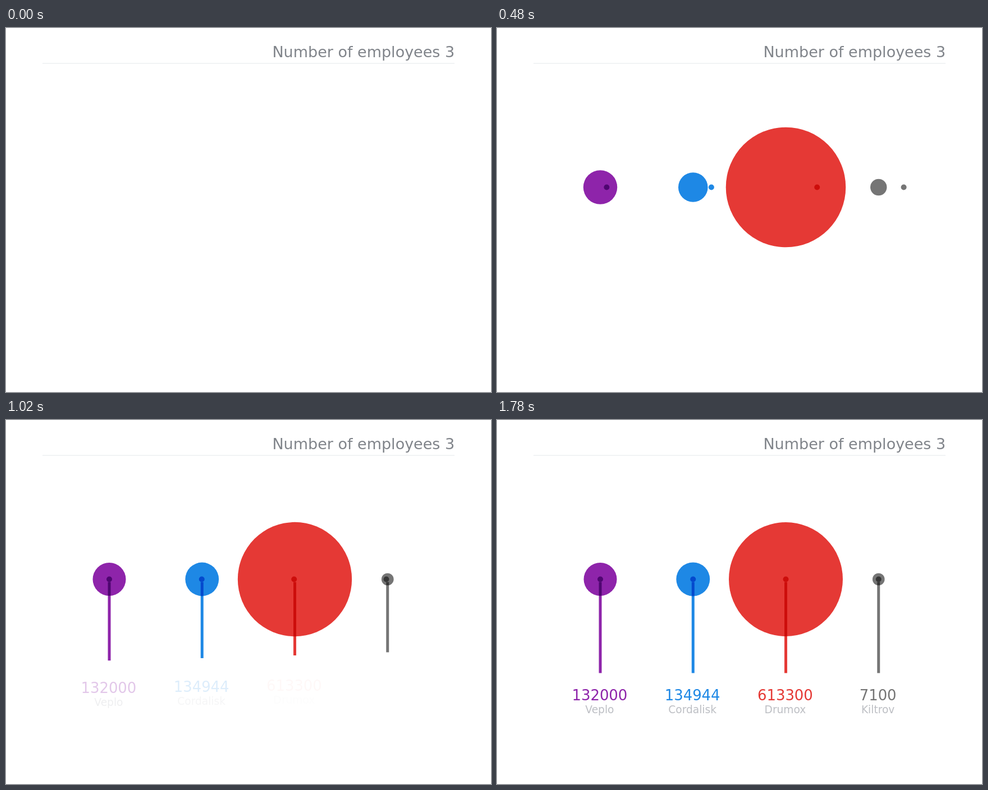
An HTML page for the animation above (5.92 s loop, 864 by 648 pixels).

```html
<!DOCTYPE html>
<html lang="en">
<head>
<meta charset="utf-8">
<title>Number of employees</title>
<style>
  html, body { margin: 0; width: 100%; height: 100%; overflow: hidden; background: #fff; }
  svg { display: block; width: 864px; height: 648px; }
  text { font-family: "DejaVu Sans", Verdana, sans-serif; text-anchor: middle; }
  circle, rect { mix-blend-mode: multiply; }
  .title { font-size: 27px; text-anchor: end; fill: #80848a; }
  .value { font-size: 25.92px; }
  .name { font-size: 18.6px; fill: #bdbfc4; }
</style>
</head>
<body>
<svg viewBox="0 0 864 648">
  <text class="title" x="799.2" y="52">Number of employees 3</text>
  <path d="M65 63H799" stroke="#e3e8eb" stroke-width="1.1"/>
  <g id="chart"></g>
</svg>
<script>
const LOOP = 5920;
const CY = 283.5;
const DOT = 5;
const LINE = 162;
const DROP = 18;

const data = [
  { name: 'Veplo', value: 132000, color: '#8e24aa' },
  { name: 'Cordalisk', value: 134944, color: '#1e88e5' },
  { name: 'Drumox', value: 613300, color: '#e53935' },
  { name: 'Kiltrov', value: 7100, color: '#757575' }
];

// Start of the first item, delay between items, and duration, in ms
const timing = {
  dot: [103, 65, 895],
  bubble: [120, 82.5, 916],
  line: [651, 27, 1130],
  label: [976, 20, 800]
};

const chart = document.getElementById('chart');

function add(parent, tag, attrs, text) {
  const node = document.createElementNS('http://www.w3.org/2000/svg', tag);
  for (const key in attrs) node.setAttribute(key, attrs[key]);
  if (text !== undefined) node.textContent = text;
  parent.appendChild(node);
  return node;
}

function progress(kind, i, time) {
  const [start, gap, duration] = timing[kind];
  return Math.min(1, Math.max(0, (time - start - gap * i) / duration));
}

function elasticOut(t, amp, period) {
  if (t <= 0) return 0;
  if (t >= 1) return 1;
  return 1 + amp * 2 ** (-10 * t) * Math.sin(t * 2 * Math.PI / period - Math.asin(1 / amp));
}

const quintOut = t => 1 - (1 - t) ** 5;

const items = data.map((d, i) => {
  const x = 184 + 165.25 * i;
  const fill = d.color;
  const item = {
    x,
    radius: 9.75 + d.value * 1.496e-4,
    bubble: add(chart, 'circle', { cx: x, cy: CY, r: 0, fill }),
    line: add(chart, 'rect', { x: x - 2.5, y: CY + DOT, width: 5, height: 0, fill }),
    dot: add(chart, 'circle', { cx: 0, cy: CY, r: DOT, fill }),
    label: add(chart, 'g', { opacity: 0 })
  };
  add(item.label, 'text', { class: 'value', x: x - 1.1, y: 499, fill }, d.value);
  add(item.label, 'text', { class: 'name', x: x - 1.1, y: 522 }, d.name);
  return item;
});

function draw(time) {
  chart.setAttribute('visibility', time < 80 ? 'hidden' : 'visible');
  items.forEach((item, i) => {
    const at = kind => progress(kind, i, time);
    const shown = quintOut(at('label'));
    item.dot.setAttribute('cx', item.x * elasticOut(at('dot'), 1.155, 1));
    item.bubble.setAttribute('r', Math.max(0, item.radius * elasticOut(at('bubble'), 1, 0.3)));
    item.line.setAttribute('height', LINE * quintOut(at('line')));
    item.label.setAttribute('opacity', shown);
    item.label.setAttribute('transform', `translate(0 ${-DROP * (1 - shown)})`);
  });
}

const origin = performance.now();

function tick() {
  draw((performance.now() - origin) % LOOP);
  requestAnimationFrame(tick);
}
tick();
</script>
</body>
</html>
```
